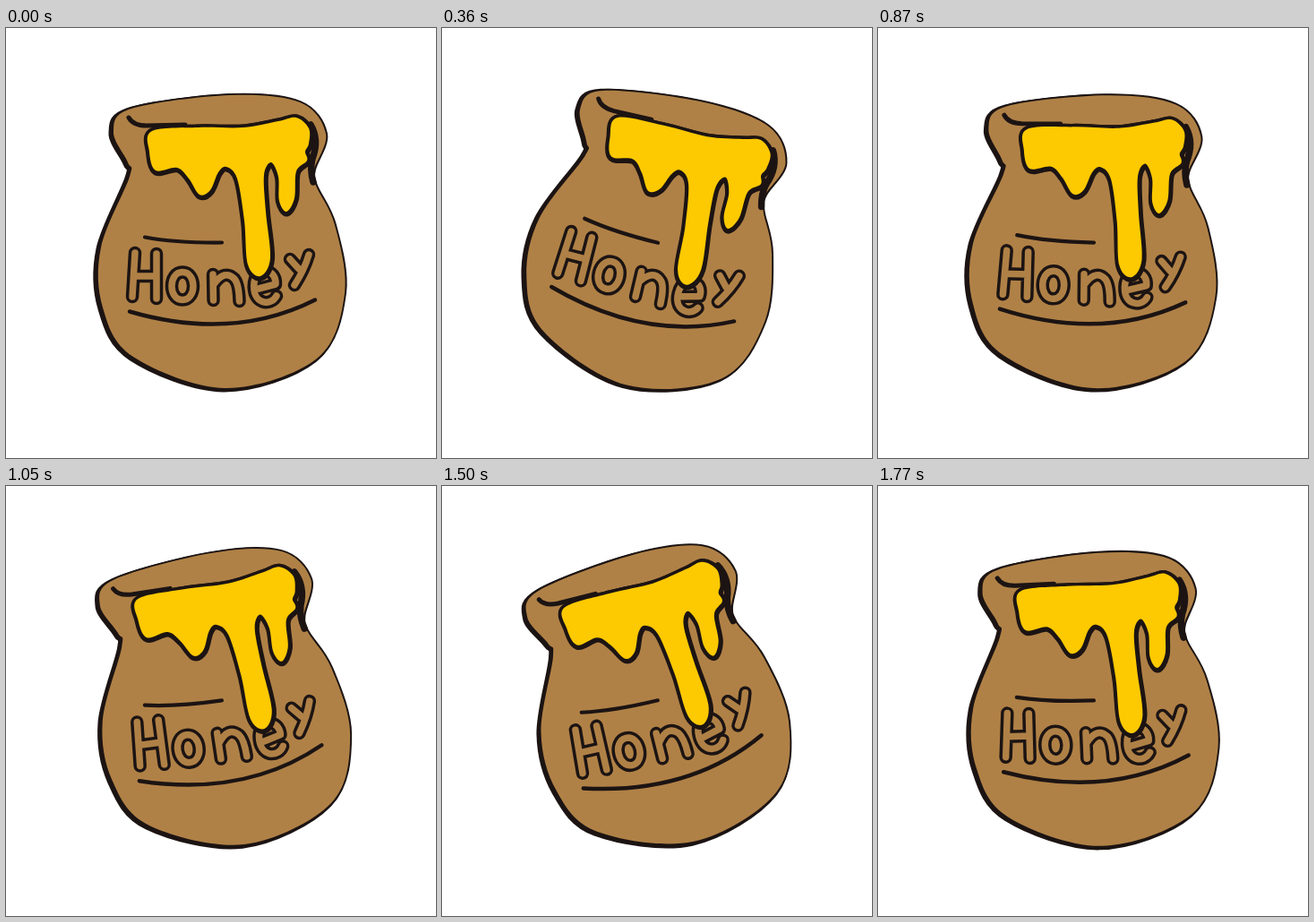
An HTML page for the animation above (1.8 s loop, 480 by 480 pixels).

```html
<!DOCTYPE html>
<html lang="en">
<head>
<meta charset="utf-8">
<title>Honey pot</title>
<style>
  html, body { margin: 0; width: 100%; height: 100%; overflow: hidden; background: #fff; }
  svg { display: block; width: 100%; height: 100%; }
</style>
</head>
<body>
<svg viewBox="0 0 480 480"><g id="pot" fill="none" stroke-linecap="round" stroke-linejoin="round"></g></svg>
<script>
const INK = '#1c1413', CLAY = '#b08146', GOLD = '#fdc900';
const LOOP = 1800, STEP = 30, SWING = 15;
const pot = document.getElementById('pot');

// Closed Catmull-Rom curve through a few key points
function blob(text) {
  const p = text.split(' ').map(s => s.split(',').map(Number));
  const at = i => p[(i + p.length) % p.length];
  const handle = (i, side) => at(i).map((v, k) => v + side * (at(i + 1)[k] - at(i - 1)[k]) / 6);
  return 'M' + p[0] + p.map((_, i) => `C${handle(i, 1)} ${handle(i + 1, -1)} ${at(i + 1)}`).join('') + 'Z';
}

function draw(d, stroke, width, extra = {}) {
  const path = document.createElementNS('http://www.w3.org/2000/svg', 'path');
  const attrs = { d, stroke, 'stroke-width': width, ...extra };
  for (const k in attrs) path.setAttribute(k, attrs[k]);
  pot.append(path);
}

// A filled shape over a shifted dark copy, so the outline is heavier on one side
function shape(d, fill, shift, heavy, light) {
  draw(d, INK, heavy, { fill: INK, transform: `translate(${shift})` });
  draw(d, INK, light, { fill, 'paint-order': 'stroke' });
}

// Hollow lettering: a dark stroke with a narrower clay one on top
function letter(d) {
  draw(d, INK, 14.5);
  draw(d, CLAY, 7.5);
}

shape(blob('120,116 140,90 250,75 328,83 357,118 344,158 346,176 367,220 378,296 ' +
  '347,369 245,402 142,367 108,312 106,245 138,166 136,150'), CLAY, '-2.5 1.5', 6, 4);

draw('M155 233.5Q190 240 241 239.5', INK, 4.2);
draw('M138 316.5Q253 350 345 303.5', INK, 4.5);

letter('M144 251L141 300M168 252L168 302M143 277L168 277');
letter('M197 272.5C213 272.5 213 303.5 197 303.5C181 303.5 181 272.5 197 272.5Z');
letter('M231 275L231.5 304M232 286Q244 269 255 280Q260 286 260.5 305');
letter('M282 291L301 286C302 268 280 266 277 284C274 309 296 311 302 299');
letter('M317 258L327 269M338 253Q333 270 322 287');

// Rim creases
draw('M137 100Q142 109 157 109L200 108', INK, 5);
draw('M340 108Q350 125 342 146Q339 158 343 172', INK, 7.5);

shape(blob('163,115 215,111 265,111 304,104 324,100 338,112 338,129 334,138 336,148 324,160 ' +
  '322,190 313,205 305,193 304,166 296,150 288,164 290,205 295,257 284,277 270,264 ' +
  '266,215 258,168 246,155 237,161 228,181 216,186 204,168 191,156 167,159 160,138'), GOLD, '0.5 1', 9, 7);

function frame(now) {
  const t = Math.floor((now % LOOP) / STEP) * STEP;
  const angle = SWING * Math.sin(2 * Math.PI * t / LOOP);
  pot.setAttribute('transform', `rotate(${angle} 240 240)`);
  requestAnimationFrame(frame);
}
frame(performance.now());
</script>
</body>
</html>
```
